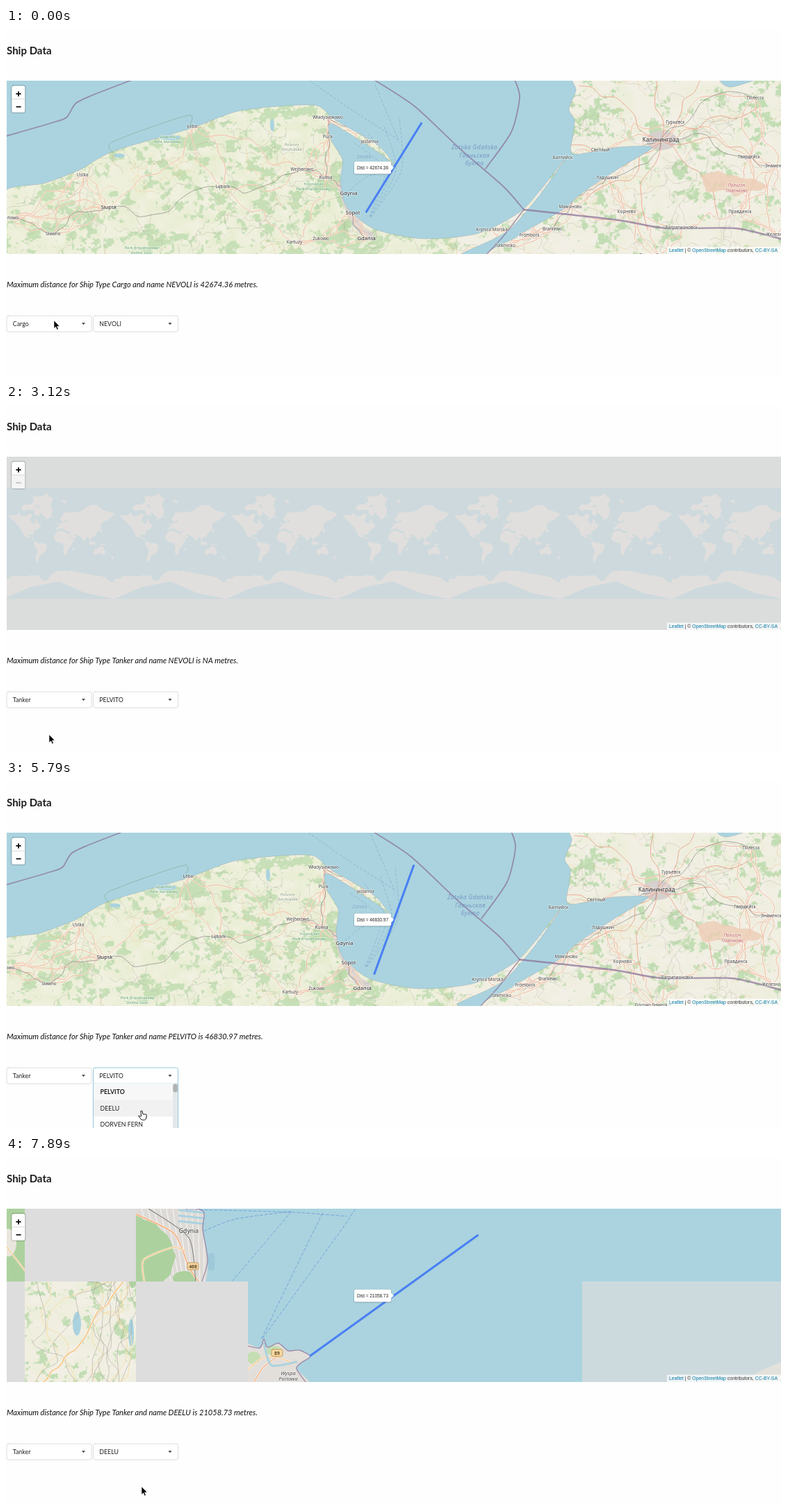
These frames come from a looping animation (1115x502 px, 8 s). An HTML page with a canvas:

```html
<!DOCTYPE html>
<html lang="en">
<head>
<meta charset="utf-8">
<title>Ship Data</title>
<style>
html, body { margin: 0; width: 100%; height: 100%; overflow: hidden; background: #fefefe; }
canvas { display: block; width: 100%; height: 100%; }
</style>
</head>
<body>
<canvas id="stage" width="1115" height="502"></canvas>
<script>
const LOOP = 8000, W = 1115, TOP = 76, BOTTOM = 326, TILE = 160.4, FULL = 1125;
const LATO = "Lato, sans-serif", NOTO = "'Noto Sans', sans-serif";
const ARIAL = "'Liberation Sans', Arial, sans-serif";
const SEA = "#aad3df", GREY = "#dddddd", BORDER = "rgba(139,113,153,.72)";
const SHIPS = ["NEVOLI", "PELVITO", "DEELU", "DORVEN FERN"];
const TYPES = ["Cargo", "Tanker", "Tug", "Fishing", "Passenger", "Pleasure"];
const ctx = document.getElementById("stage").getContext("2d");

const clamp = v => Math.max(0, Math.min(1, v));
const mix = (a, b, k) => a + (b - a) * k;
const ease = v => v * v * (3 - 2 * v);
const hash = (x, y) => { const s = Math.sin(x * 127.1 + y * 311.7) * 43758.5453; return s - Math.floor(s); };
function noise(x, y) {
  const i = Math.floor(x), j = Math.floor(y), u = ease(x - i), v = ease(y - j);
  return mix(mix(hash(i, j), hash(i + 1, j), u), mix(hash(i, j + 1), hash(i + 1, j + 1), u), v);
}

// points are flat lists: x, y, x, y ...
const pairs = p => Array.from({ length: p.length / 2 }, (_, i) => [p[2 * i], p[2 * i + 1]]);

// smooth curve through every key point
function curve(g, p, closed) {
  const q = pairs(p), n = q.length;
  const at = i => closed ? q[(i + n) % n] : q[Math.max(0, Math.min(n - 1, i))];
  g.beginPath();
  g.moveTo(...q[0]);
  for (let i = 0; i < (closed ? n : n - 1); i++) {
    const [a, b, c, d] = [at(i - 1), at(i), at(i + 1), at(i + 2)];
    g.bezierCurveTo(b[0] + (c[0] - a[0]) / 8, b[1] + (c[1] - a[1]) / 8,
      c[0] - (d[0] - b[0]) / 8, c[1] - (d[1] - b[1]) / 8, c[0], c[1]);
  }
}
// splits every side and pushes its middle sideways by a seeded amount
function rough(p, amount, closed, rounds = 3) {
  for (let k = 0; k < rounds; k++) {
    const q = pairs(p), out = [];
    q.forEach(([x, y], i) => {
      out.push(x, y);
      if (i === q.length - 1 && !closed) return;
      const [nx, ny] = q[(i + 1) % q.length];
      const push = (hash(x + nx, y + ny) - .5) * amount;
      out.push((x + nx) / 2 - (ny - y) * push, (y + ny) / 2 + (nx - x) * push);
    });
    p = out;
  }
  return p;
}
function line(g, color, width, p, dash = []) {
  curve(g, p);
  g.strokeStyle = color; g.lineWidth = width;
  g.setLineDash(dash); g.stroke(); g.setLineDash([]);
}
function area(g, fill, p) { curve(g, p, true); g.fillStyle = fill; g.fill(); }
function polygon(g, fill, p) {
  g.beginPath();
  pairs(p).forEach(([x, y]) => g.lineTo(x, y));
  g.closePath(); g.fillStyle = fill; g.fill();
}
function oval(g, fill, x, y, rx, ry = rx) { g.beginPath(); g.ellipse(x, y, rx, ry, 0, 0, 7); g.fillStyle = fill; g.fill(); }
function box(g, x, y, w, h, r, fill, stroke) {
  g.beginPath(); g.roundRect(x, y, w, h, r);
  if (fill) { g.fillStyle = fill; g.fill(); }
  if (stroke) { g.strokeStyle = stroke; g.lineWidth = 1; g.stroke(); }
}
function text(g, str, x, y, font, color, align = "left") {
  g.font = font; g.fillStyle = color; g.textAlign = align;
  g.fillText(str, x, y);
}
function label(g, str, x, y, size, color, style = "") {
  const font = `${style} ${size}px ${NOTO}`;
  str.split("\n").forEach((row, i) => {
    const base = y + size * (.36 + i * 1.18);
    g.font = font; g.textAlign = "center";
    g.strokeStyle = "rgba(255,255,255,.6)"; g.lineWidth = 1.5;
    g.strokeText(row, x, base);
    text(g, row, x, base, font, color, "center");
  });
}
// offscreen layer in stage coordinates, starting at the top of the map
function layer(paint) {
  const c = document.createElement("canvas");
  c.width = FULL; c.height = 256;
  const g = c.getContext("2d");
  g.translate(0, -TOP);
  g.lineJoin = g.lineCap = "round";
  paint(g);
  return c;
}

// fields and woods: greener in the west, paler in the east
const terrain = layer(g => {
  const img = g.createImageData(FULL, 256), d = img.data;
  const hill = (x, y, cx, cy, rx, ry) => Math.exp(-(((x - cx) / rx) ** 2) - ((y - cy) / ry) ** 2);
  for (let y = 0, k = 0; y < 256; y++) for (let x = 0; x < FULL; x++, k += 4) {
    const f = noise(x / 19, y / 15) * .42 + noise(x / 8 + 40, y / 7) * .34 + noise(x / 3, y / 3 + 90) * .24;
    const isWest = x < 650, sy = y + TOP;
    const dark = hill(x, sy, 487, 270, 11, 34) + hill(x, sy, 440, 228, 28, 13);
    const edge = (isWest ? .535 : .6) - dark * .2 - hill(x, sy, 1080, 95, 45, 25) * .1 - hill(x, sy, 390, 165, 55, 35) * .05;
    const wood = clamp((f - edge) / .09) * (isWest ? .75 : .85);
    const field = noise(x / 13 + 7, y / 11 + 3);
    const base = isWest ? [mix(242, 232, field), mix(241, 237, field), mix(226, 209, field)]
      : [mix(243, 237, field), mix(239, 238, field), mix(231, 219, field)];
    const tree = [mix(186, 168, clamp(dark)), mix(218, 208, clamp(dark)), mix(171, 150, clamp(dark))];
    for (let c = 0; c < 3; c++) d[k + c] = mix(base[c], tree[c], wood);
    d[k + 3] = 255;
  }
  g.putImageData(img, 0, 0);
});

const towns = {
  "Łeba": [268, 142], "Ustka": [110, 212], "Władysławowo": [463, 129], "Puck": [463, 157], "Jastarnia": [523, 164],
  "Wejherowo": [426, 204], "Rumia": [460, 216], "Lębork": [312, 229], "Sławno": [68, 297], "arłowo": [8, 274],
  "Żukowo": [453, 304], "Kartuzy": [415, 309], "Krynica Morska": [699, 291], "Frombork": [753, 299],
  "Tolkmicko": [718, 314], "Braniewo": [786, 290], "Полесск": [1078, 101], "Гурьевск": [963, 136],
  "Гвардейск": [1069, 186], "Знаменск": [1107, 199], "Балтийск": [801, 187], "Светлый": [855, 176],
  "Ладушкин": [865, 216], "Мамоново": [812, 258], "Корнево": [893, 265], "Правдинск": [1056, 265],
  "Багратионовск": [972, 288], "Железно": [1107, 298], "Górowo Iławeckie": [937, 328]
};
const cities = { "Gdynia": [493, 238], "Sopot": [499, 266], "Gdańsk": [519, 303], "Słupsk": [148, 258], "Калининград": [942, 161] };
const places = { ...towns, ...cities };

const west = [-5, 239, 55, 224, 105, 205, 154, 178, 262, 146, 330, 121, 390, 113, 447, 112, 474, 133, 535, 169, 560, 200,
  541, 183, 469, 138, 467, 160, 484, 190, 481, 222, 490, 258, 530, 290, 600, 304, 680, 296, 746, 260, 803, 190,
  767, 242, 720, 294, 655, 326, 650, 340, -5, 340];
const east = [708, 335, 735, 301, 800, 263, 830, 237, 886, 200, 930, 172, 880, 172, 816, 182, 816, 154, 818, 132, 810, 117,
  820, 90, 823, 60, 1000, 60, 1040, 85, 1130, 82, 1130, 340];

const coastMap = layer(g => {
  g.fillStyle = SEA; g.fillRect(0, TOP, FULL, 256);
  const rail = names => {
    for (let i = 1; i < names.length; i++)
      line(g, "rgba(110,110,110,.7)", .8, rough([...places[names[i - 1]], ...places[names[i]]], .35));
  };
  for (const shore of [west, east]) {
    g.save();
    curve(g, shore, true);
    g.clip();
    g.drawImage(terrain, 0, TOP);
    line(g, "#d9d4d0", 11, [482, 228, 494, 262, 510, 290, 525, 300]);
    oval(g, "#d6d0ce", 943, 162, 22, 14);
    // lanes wander, main roads join each town to its nearest neighbours
    for (let i = 0; i < 260; i++) {
      const x = hash(i, 1) * FULL, y = TOP + hash(i, 2) * 256, a = hash(i, 3) * 6.3;
      line(g, i % 4 ? "rgba(160,152,145,.4)" : "rgba(240,190,130,.55)", .7,
        rough([x, y, x + Math.cos(a) * 60, y + Math.sin(a) * 45], .8));
    }
    const spots = Object.values(places);
    for (const a of spots) {
      const far = b => Math.hypot(a[0] - b[0], a[1] - b[1]);
      for (const b of [...spots].sort((p, q) => far(p) - far(q)).slice(1, 4)) {
        const p = rough([...a, ...b].map(v => v + 1), .4);
        line(g, "rgba(255,255,255,.7)", 1.8, p);
        line(g, "#eeb394", 1, p);
      }
    }
    for (let i = 0; i < 9; i++) {
      const a = i * .7 + .3;
      line(g, "#eca993", 1, rough([943, 163, 943 + Math.cos(a) * 150, 163 + Math.sin(a) * 130], .35));
    }
    rail(["arłowo", "Sławno", "Słupsk", "Lębork", "Wejherowo", "Rumia", "Gdynia", "Sopot", "Gdańsk"]);
    rail(["Rumia", "Puck", "Władysławowo", "Jastarnia"]);
    rail(["Braniewo", "Мамоново", "Ладушкин", "Калининград", "Гвардейск", "Знаменск"]);
    rail(["Светлый", "Калининград", "Полесск"]);
    g.restore();
    curve(g, shore, true);
    g.strokeStyle = "rgba(130,135,145,.4)"; g.lineWidth = .7; g.stroke();
  }
  oval(g, SEA, 163, 184, 8, 3);
  oval(g, SEA, 236, 158, 15, 4);
  oval(g, SEA, 383, 140, 3, 9);
  area(g, "rgba(238,205,182,.8)", rough([1000, 213, 1050, 213, 1095, 228, 1050, 243, 1008, 236], .35, true, 2));

  // ferry lanes and frontiers
  for (let i = 0; i < 4; i++)
    line(g, "rgba(105,140,190,.5)", .8, [523 + i, 272, 545 + i * 8, 205, 500 + i * 22, 165 - i * 12], [3, 3]);
  line(g, "rgba(105,140,190,.55)", .8, [437, 76, 500, 120, 563, 160], [3, 3]);
  line(g, "rgba(105,140,190,.55)", .8, [531, 82, 566, 165], [3, 3]);
  line(g, "rgba(105,140,190,.55)", .8, [490, 238, 520, 214, 560, 207], [3, 3]);
  line(g, "rgba(120,165,135,.7)", .8, [154, 180, 154, 164, 262, 126, 262, 146]);
  line(g, BORDER, 1.8, [0, 156, 72, 135, 88, 128, 100, 109, 124, 97, 181, 75]);
  line(g, BORDER, 1.8, [530, 75, 588, 113, 655, 176, 715, 228, 745, 262]);
  line(g, BORDER, 1.8, [732, 75, 739, 100, 727, 150, 690, 203]);
  line(g, BORDER, 1.5, [745, 262, 715, 301, 690, 328]);
  line(g, BORDER, 2.4, [745, 262, 880, 277, 950, 289, 1050, 289, 1125, 307]);

  for (const [name, [x, y]] of Object.entries(towns)) label(g, name, x, y, 6.3, "#444");
  for (const [name, [x, y]] of Object.entries(cities)) label(g, name, x, y, name === "Калининград" ? 8.1 : 7.6, "#2a2a2a");
  label(g, "Słowiński\nPark Narodowy", 233, 157, 5.9, "#559b61", "italic");
  label(g, "Trójmiejski\nPark Krajobrazowy", 442, 225, 5.9, "#559b61", "italic");
  label(g, "Park Krajobrazowy\nDolina Słupi", 195, 317, 5.9, "#559b61", "italic");
  label(g, "Puszcza\nDarżlubska", 411, 168, 5.9, "#84977e", "italic");
  label(g, "Полигон\nПовенково", 1051, 227, 6.2, "#b95b60", "italic");
  g.letterSpacing = ".4px";
  ["Zatoka Gdańska", "Гданьская", "бухта"].forEach((row, i) =>
    text(g, row, 674, 175 + i * 11.7, "italic 8.4px " + NOTO, "#7896c2", "center"));
  text(g, "Zatoka", 515, 188, "italic 6.3px " + NOTO, "#85aac8", "center");
});

// whole globe in Mercator projection, repeated sideways
const worldMap = layer(g => {
  const mid = 201;
  g.fillStyle = "#dbdddc"; g.fillRect(0, TOP, FULL, 256);
  g.fillStyle = "#cdd9dd"; g.fillRect(0, mid - TILE / 2, FULL, TILE);
  const project = (v, i) => i % 2
    ? mid - TILE / (2 * Math.PI) * Math.log(Math.tan(Math.PI / 4 + v * Math.PI / 360))
    : 557 + v * TILE / 360;
  const land = (p, amount = .5) => {
    const q = rough(p.map(project), amount, true, 2);
    for (let k = -4; k <= 4; k++) {
      g.save(); g.translate(k * TILE, 0); polygon(g, "#e1dfdd", q); g.restore();
    }
  };
  land([-168, 66, -128, 70, -82, 68, -94, 60, -80, 52, -75, 62, -56, 52, -81, 27, -97, 27, -95, 18, -78, 8, -105, 20, -124, 43, -150, 60]);
  land([-122, 75, -85, 82, -63, 82.5, -80, 75, -62, 66, -78, 72], .8);
  land([-73, 78, -35, 83.4, -18, 81, -22, 70, -43, 60, -53, 68]);
  land([-78, 8, -50, 1, -35, -6, -40, -20, -58, -36, -68, -54, -74, -48, -70, -18, -81, -5], .3);
  land([-6, 36, 32, 31, 43, 11, 51, 11, 40, -8, 26, -34, 18, -34, 9, 3, -8, 5, -17, 15], .3);
  land([-9, 37, -8, 43, 2, 51, 10, 55, 24, 57, 28, 60, 14, 56, 5, 60, 14, 68, 26, 71, 75, 72, 105, 77, 180, 69, 160, 60, 135, 54,
    122, 30, 108, 20, 103, 2, 92, 22, 78, 8, 70, 22, 52, 27, 58, 18, 44, 13, 36, 36, 24, 37, 13, 45], .4);
  land([114, -22, 130, -12, 142, -11, 153, -27, 147, -38, 130, -31, 116, -35], .4);
  const ice = [];
  for (let lon = -180; lon <= 180; lon += 12)
    ice.push(lon, -69 - 3 * Math.sin(lon / 40 - 2) - 8 * Math.exp(-(((lon + 42) / 18) ** 2)) - 7 * Math.exp(-(((Math.abs(lon) - 180) / 25) ** 2)));
  land([...ice, 180, -85.05, -180, -85.05], .35);
  const island = (x, y, w, h) => land([x - w, y, x, y + h, x + w, y, x, y - h], .8);
  island(103, 0, 8, 5); island(114, 0, 6, 5); island(141, -5, 10, 4); island(47, -19, 3, 6);
  island(138, 37, 5, 6); island(-3, 54, 3, 4); island(-18, 65, 5, 1.5); island(173, -41, 4, 5); island(18, 79, 9, 1);
});

const bayMap = layer(g => {
  g.fillStyle = SEA; g.fillRect(0, TOP, FULL, 256);
  const street = (c, w, p) => { line(g, "#fff", w + 1, p); line(g, c, w, p); };
  const shield = (n, x, y) => {
    box(g, x - 8, y - 5, 16, 10, 2, "#f8d9a4", "#c49a5c");
    text(g, n, x, y + 2.5, "bold 6.8px " + NOTO, "#5a4320", "center");
  };
  const ferry = p => line(g, "rgba(90,135,215,.65)", 1, p, [4, 3]);

  // hills and countryside
  polygon(g, "#add19e", [0, 76, 27, 76, 27, 181, 0, 181]);
  oval(g, "#e9e6dd", 3, 125, 12, 20);
  street("#f4c98d", 1.4, [0, 130, 27, 165]);
  g.drawImage(terrain, 830, 60, TILE, 150, 27, 181, TILE, 150);
  oval(g, SEA, 102, 242, 6, 17);
  oval(g, SEA, 180, 255, 4, 20);
  for (let i = 0; i < 14; i++)
    line(g, i % 3 ? "rgba(160,152,145,.5)" : "#f8dfa8", 1,
      rough([27 + hash(i, 1) * 160, 181, 27 + hash(i, 2) * 160, 330], .5));
  street("#f4c98d", 2, rough([54, 326, 105, 273, 169, 181], .2));

  // harbour town
  const quay = [254, 70, 284, 80, 283, 106, 290, 152, 278, 192];
  g.save();
  curve(g, [180, 70, ...quay, 180, 192], true);
  g.clip();
  g.fillStyle = "#dedbd7"; g.fillRect(180, 70, 120, 120);
  for (let i = 0; i < 12; i++)
    line(g, "rgba(255,255,255,.8)", 1, [195 + i * 9, 76, 225 + i * 6, 181]);
  area(g, "#add19e", rough([187, 84, 232, 114, 244, 145, 215, 190, 180, 190], .3, true, 2));
  oval(g, "#add19e", 257, 176, 17, 10);
  street("#f3b68a", 2, [187, 84, 242, 112, 263, 160, 277, 181]);
  street("#f4c98d", 1.6, [199, 181, 198, 150, 240, 132, 258, 137]);
  line(g, "#888", 1.2, [205, 76, 263, 118, 273, 181]);
  g.restore();
  for (let y = 78; y < 100; y += 8) line(g, SEA, 3, [249, y, 286, y + 4]);
  line(g, BORDER, 1.4, quay);
  box(g, 291, 140, 9, 25, 3, "rgba(140,180,205,.35)");
  label(g, "Gdynia", 263, 108, 8.6, "#333");
  shield("468", 269, 159);

  // port
  const port = [340, 272, 365, 277, 371, 264, 376, 276, 392, 270, 406, 281, 422, 280, 438, 289, 425, 298, 418, 307, 434, 330];
  area(g, "#e2deda", [...port, 340, 330]);
  oval(g, "#c4deb1", 356, 291, 10, 9);
  oval(g, "#c4deb1", 386, 281, 11, 7);
  street("#f4c98d", 1.6, [347, 309, 368, 292, 390, 290, 415, 300]);
  street("#f3b68a", 1.6, [357, 326, 369, 306, 392, 288]);
  line(g, SEA, 3, [371, 270, 382, 302, 418, 297]);
  line(g, BORDER, 1.4, port);
  shield("89", 390, 284);
  label(g, "Wyspa\nPortowa", 406, 313, 7.4, "#444", "italic");

  ferry([258, 77, 410, 81, 490, 87]);
  ferry([285, 108, 330, 91, 410, 80]);
  ferry([410, 81, 326, 180]);
  ferry([455, 83, 415, 165, 368, 263]);
  ferry([502, 77, 480, 110, 369, 263]);
  polygon(g, "#eeeadb", [1060, 326, 1085, 310, 1125, 293, 1125, 335]);
});

function showMap(img, dx = 0, dy = 0) {
  ctx.save();
  ctx.beginPath(); ctx.rect(1, TOP, W, BOTTOM - TOP); ctx.clip();
  ctx.drawImage(img, dx, TOP + dy);
  ctx.restore();
}
// tiles fade in one by one; a few are still missing at the end
function showTiles(t) {
  const missing = ["0,1", "1,0", "1,2"];
  for (let row = 0; row < 2; row++) for (let col = 0; col < 8; col++) {
    if (missing.includes(row + "," + col)) continue;
    const start = row && col > 5 ? 7830 : 7480 + hash(col, row + 4) * 190;
    const x0 = Math.max(1, Math.round(27 + (col - 1) * TILE)), x1 = Math.min(W, Math.round(27 + col * TILE));
    const y = row ? 181 : TOP, h = (row ? BOTTOM : 181) - y;
    ctx.globalAlpha = clamp((t - start) / 200);
    ctx.drawImage(bayMap, x0, y - TOP, x1 - x0, h, x0, y, x1 - x0, h);
  }
  ctx.globalAlpha = 1;
}
function route(x0, y0, x1, y1, dist, alpha) {
  ctx.globalAlpha = alpha;
  ctx.lineCap = "round";
  line(ctx, "#4a80f3", 3.1, [x0, y0, x1, y1]);
  ctx.globalAlpha = 1;
  ctx.save();
  ctx.shadowColor = "rgba(0,0,0,.4)"; ctx.shadowBlur = 2; ctx.shadowOffsetY = .6;
  box(ctx, 501, 192.5, 53, 18, 2, "#fff");
  ctx.restore();
  polygon(ctx, "#fff", [554, 197.5, 558, 201.5, 554, 205.5]);
  text(ctx, "Dist = " + dist, 527.5, 204, "6.4px " + ARIAL, "#222", "center");
}
function controls(atMin) {
  box(ctx, 7.8, 82.8, 20, 39.6, 3, null, "rgba(0,0,0,.25)");
  box(ctx, 8.4, 83.4, 18.8, 38.4, 2.2, "#fff");
  if (atMin) { ctx.fillStyle = "#f4f4f4"; ctx.fillRect(8.4, 102.5, 18.8, 19); }
  ctx.fillStyle = "#ccc"; ctx.fillRect(8.4, 102, 18.8, .7);
  ctx.fillStyle = "#000"; ctx.fillRect(14.4, 94.1, 7.2, 1.7); ctx.fillRect(17.15, 91.4, 1.7, 7.2);
  ctx.fillStyle = atMin ? "#bbb" : "#000"; ctx.fillRect(14.6, 112.8, 7, 1.7);

  ctx.fillStyle = "rgba(255,255,255,.7)"; ctx.fillRect(951, 315.5, W - 951, 10.5);
  let x = 954;
  ["Leaflet", " | © ", "OpenStreetMap", " contributors, ", "CC-BY-SA"].forEach((str, i) => {
    text(ctx, str, x, 323, "6.9px " + ARIAL, i % 2 ? "#333" : "#0078a8");
    x += ctx.measureText(str).width;
  });
}
function select(x, value, open) {
  box(ctx, x + .5, 415, 122, 23.2, 2.5, "#fff", open === 1 ? "#96c8da" : open ? "#b9b9ba" : "#dcdcdd");
  text(ctx, value, x + 9.3, 430, "8.8px " + LATO, "#222");
  polygon(ctx, "#444", [x + 108.4, 425.2, x + 113.6, 425.2, x + 111, 428.2]);
}
function menu(x, items, scale, chosen, hover, thumb) {
  if (!scale) return;
  const tall = 152, row = 23.5;
  ctx.save();
  ctx.translate(x, 438);
  ctx.scale(1, scale);
  ctx.globalAlpha = scale < 1 ? scale * .9 + .1 : 1;
  ctx.fillStyle = "#fff"; ctx.fillRect(.5, 0, 122, tall);
  items.forEach((item, i) => {
    if (scale === 1 && (i === hover || i === chosen)) {
      ctx.fillStyle = i === hover ? "#f1f1f1" : "#f7f7f7";
      ctx.fillRect(1, i * row + .5, 121, row);
    }
    text(ctx, item, 10.6, 15 + i * row, (i === chosen ? "bold " : "") + "8.8px " + LATO, "#222");
  });
  ctx.fillStyle = "#e3e9ea"; ctx.fillRect(115, 0, 7, tall);
  box(ctx, 115.3, .5, 6.4, thumb, 3, "#b0b2b0");
  if (scale === 1) { ctx.fillStyle = "#96c8da"; ctx.fillRect(0, 0, 1, tall); ctx.fillRect(122, 0, 1, tall); }
  ctx.restore();
}
function pointer(x, y, hand) {
  ctx.save();
  ctx.translate(x, y);
  ctx.lineJoin = "round";
  if (hand) {
    curve(ctx, [-1, 1, 0, 0, 1.3, 1, 2, 5, 6.6, 5.3, 7, 9, 5.5, 13, 0, 13, -4.2, 7.4, -.6, 8], true);
    ctx.fillStyle = "#fff"; ctx.strokeStyle = "#111"; ctx.lineWidth = 1;
    ctx.fill(); ctx.stroke();
  } else {
    polygon(ctx, "#000", [0, 0, 0, 11.4, 2.6, 9, 4.4, 13.2, 6.3, 12.4, 4.5, 8.3, 8, 8.2]);
    ctx.strokeStyle = "#fff"; ctx.lineWidth = .6; ctx.stroke();
  }
  ctx.restore();
}

const TICK = 150;
function cursorAt(t) {
  let x = 69, y = 422;
  for (const [from, ticks, toX, toY] of [[1930, 2, 62, 477], [4170, 4, 190, 421], [5340, 3, 195, 477]]) {
    const k = clamp(Math.floor((t - from) / TICK) / ticks);
    x = mix(x, toX, k); y = mix(y, toY, k);
  }
  return [x, y];
}
function menuScale(t, start, close) {
  if (t < start || t >= close + TICK) return 0;
  return t >= close ? .42 : clamp((Math.floor((t - start) / 147) + 1) / 5);
}

function draw(t) {
  const pick = t < 3270 ? 0 : t < 7290 ? 1 : 2;
  const dist = t >= 3120 && t < 3270 ? "NA" : ["42674.36", "46830.97", "21058.73"][pick];
  ctx.fillStyle = "#fefefe"; ctx.fillRect(0, 0, W, 502);
  text(ctx, "Ship Data", 1, 38.2, "bold 15.04px " + LATO, "#1b1c1d");
  text(ctx, `Maximum distance for Ship Type ${t < 3120 ? "Cargo" : "Tanker"} and name ${SHIPS[pick]} is ${dist} metres.`,
    1, 373.8, "italic 11.07px " + LATO, "#111");

  ctx.fillStyle = GREY; ctx.fillRect(1, TOP, W, BOTTOM - TOP);
  if (t < 3120) {
    showMap(coastMap);
    route(518.5, 265, 597.5, 137.5, dist, 1);
  } else if (t < 3270) {
    showMap(worldMap);
  } else if (t < 7290) {
    ctx.globalAlpha = t < 3420 ? .5 : 1;
    showMap(coastMap, -6, -3);
    route(530, 279.5, 586.5, 123.5, dist, t < 3420 ? .8 : 1);
  } else {
    showTiles(t - (t - 7290) % TICK);
    route(438, 288, 678.5, 114.5, dist, t < 7440 ? .8 : 1);
  }
  controls(dist === "NA");

  const [x, y] = cursorAt(t);
  const typeOpen = menuScale(t, 1050, 2970), shipOpen = menuScale(t, 4760, 7140);
  const hand = y > 438 && (typeOpen === 1 || shipOpen === 1);
  const hover = Math.floor((y - 438) / 23.5);
  select(.5, t < 2970 ? "Cargo" : "Tanker", typeOpen);
  select(125, SHIPS[t < 3120 ? 0 : t < 7140 ? 1 : 2], shipOpen);
  menu(.5, TYPES, typeOpen, t < 2970 ? 0 : 1, hover, 103);
  menu(125, SHIPS.slice(1), shipOpen, t < 7140 ? 0 : 1, hover, 12);
  pointer(x, y, hand);
}

const began = performance.now();
function tick() {
  draw((performance.now() - began) % LOOP);
  requestAnimationFrame(tick);
}
tick();
</script>
</body>
</html>
```
